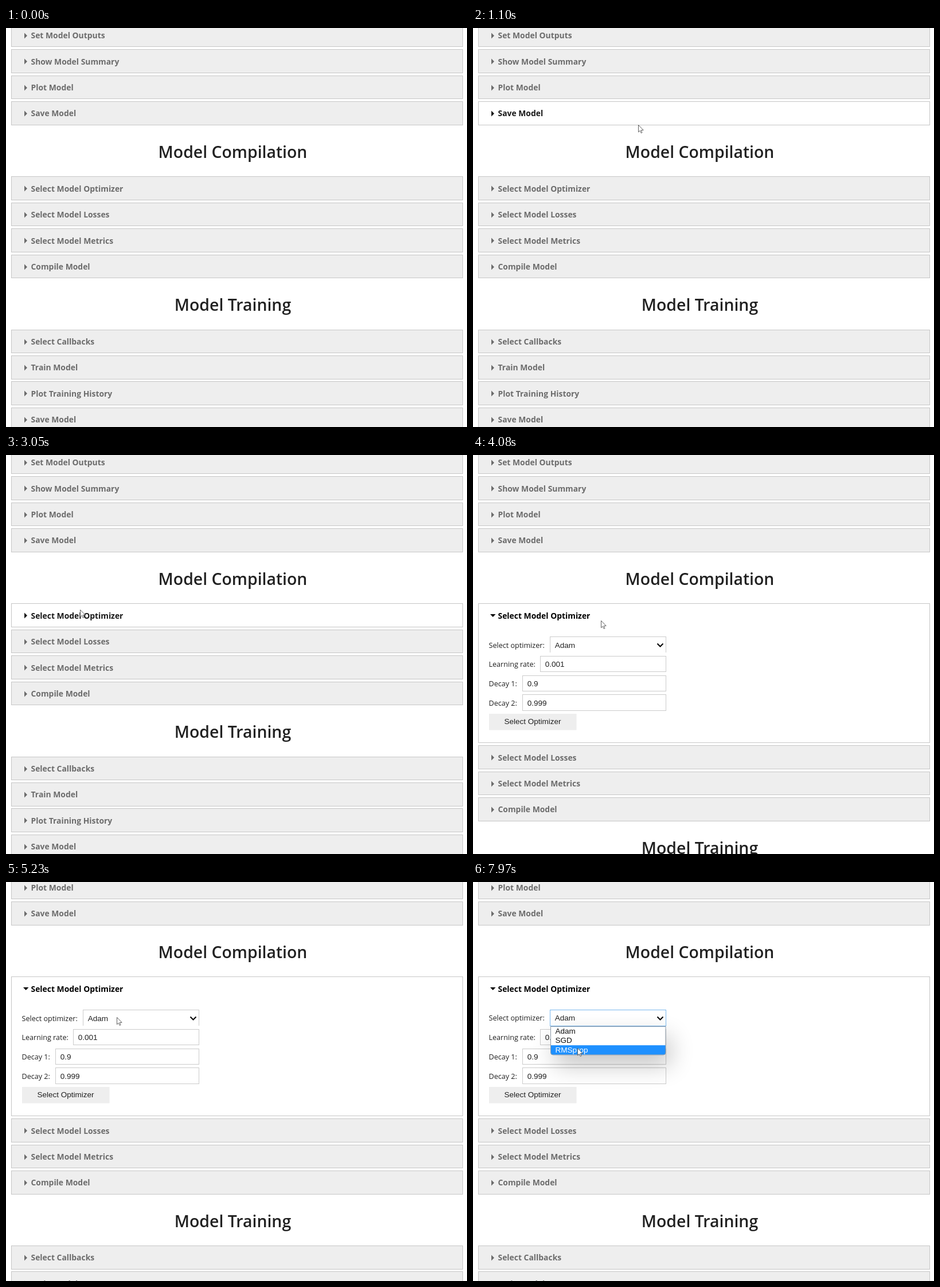
These frames come from a looping animation (804x697 px, 8 s). An HTML page with a canvas:

```html
<!DOCTYPE html>
<html lang="en">
<head>
<meta charset="utf-8">
<title>Model builder</title>
<style>
  html, body { margin: 0; height: 100%; overflow: hidden; background: #fff; }
  canvas { display: block; }
</style>
</head>
<body>
<canvas id="stage" width="804" height="697"></canvas>
<script>
const ctx = document.getElementById('stage').getContext('2d');
const LOOP = 8000, STEP = 69.7, OPEN = 4080, SCROLL = 4540, FOCUS = 5800;
const ROW_PITCH = 45.4, ROW_HEIGHT = 41.6, OPEN_EXTRA = 202.4;
const FIELD_PITCH = 33.8, OPTION_HEIGHT = 16.6;
const UI = '"Open Sans", "Noto Sans", sans-serif';
const ARIAL = '13.5px "Liberation Sans", Arial, sans-serif';
const BORDER = '#c6c6c6', INK = '#212121';

const sections = [
  { top: -8.2, rows: ['Set Model Outputs', 'Show Model Summary', 'Plot Model', 'Save Model'] },
  { title: 'Model Compilation', top: 259.4,
    rows: ['Select Model Optimizer', 'Select Model Losses', 'Select Model Metrics', 'Compile Model'] },
  { title: 'Model Training', top: 526.6,
    rows: ['Select Callbacks', 'Train Model', 'Plot Training History', 'Save Model'] },
];
const fields = [
  ['Select optimizer:', 134, 'Adam'],
  ['Learning rate:', 117, '0.001'],
  ['Decay 1:', 86, '0.9'],
  ['Decay 2:', 86, '0.999'],
];
const options = ['Adam', 'SGD', 'RMSprop'];

const mix = (a, b, u) => a + (b - a) * u;
const smooth = u => u * u * (3 - 2 * u);
const clamp = u => Math.min(1, Math.max(0, u));

const hold = (t, start) => start + Math.floor((t - start) / STEP) * STEP;

const line = (x0, y0, x1, y1) => u => [mix(x0, x1, smooth(u)), mix(y0, y1, smooth(u))];

function enter(u) {
  const cubic = (a, b, c, d) =>
    a * (1 - u) ** 3 + 3 * b * u * (1 - u) ** 2 + 3 * c * u * u * (1 - u) + d * u ** 3;
  return [cubic(742, 816, 470, 288), cubic(676, 298, 140, 169)];
}

// Widening elliptical loop around the first heading
function circle(u) {
  const angle = mix(-2.02, -10.3, u), radius = mix(.7, 1.7, u);
  return [350 + 205 * radius * Math.cos(angle), 202 + 52 * radius * Math.sin(angle)];
}

const moves = [
  { from: 330, to: 1100, path: enter },
  { from: 1100, to: 3050, path: circle },
  { from: 3050, to: 3610, path: line(129, 270, 223, 289) },
  { from: SCROLL, to: 5230, path: line(224, 289, 192, 235) },
  { from: 6290, to: 6700, path: line(192, 235, 191, 243) },
  { from: 6900, to: 7300, path: line(191, 243, 185, 269) },
  { from: 7760, to: 7970, path: line(185, 271, 182, 290) },
];

function pointerAt(t) {
  const move = moves.findLast(m => m.from <= t);
  if (!move) return null;
  const { from, to, path } = move;
  const [x, y] = path(clamp((hold(t, from) - from) / (to - from))).map(Math.round);
  return { x, y };
}

function scrollAt(t) {
  if (t < SCROLL) return 0;
  return Math.round(94 * smooth(clamp((hold(t, SCROLL) - SCROLL + 52) / 190)));
}

function text(str, x, y, font, color, align = 'left') {
  ctx.font = font;
  ctx.fillStyle = color;
  ctx.textAlign = align;
  ctx.fillText(str, x, Math.round(y));
}

// Bordered box with its edges snapped to whole pixels
function box(x, top, right, bottom, fill, stroke) {
  const y = Math.round(top), w = right - x, h = Math.round(bottom) - y;
  ctx.fillStyle = fill;
  ctx.fillRect(x, y, w, h);
  ctx.strokeStyle = stroke;
  ctx.lineWidth = 1;
  ctx.strokeRect(x + .5, y + .5, w - 1, h - 1);
}

function polygon(points, color) {
  ctx.beginPath();
  points.forEach(([x, y]) => ctx.lineTo(x, y));
  ctx.closePath();
  ctx.fillStyle = color;
  ctx.fill();
}

function drawRow(label, top, open, hover) {
  const mid = Math.round(top) + 21.5;
  const color = open ? '#000' : hover ? '#181818' : '#6c6c6c';
  const bottom = top + ROW_HEIGHT + (open ? OPEN_EXTRA : 0);
  box(9, top, 797, bottom, open || hover ? '#fff' : '#eee', BORDER);
  polygon(open
    ? [[30, mid - 2.5], [39.5, mid - 2.5], [34.7, mid + 2.5]]
    : [[32, mid - 5], [37, mid], [32, mid + 5]], color);
  text(label, 43.5, top + 26.4, `bold 13.9px ${UI}`, color);
}

function drawForm(top, focused) {
  fields.forEach(([label, x, value], i) => {
    const y = top + FIELD_PITCH * i, lift = focused && !i ? 1 : 0;
    box(x, y, 337, y + 28.6, '#fff', lift ? '#7ab8ee' : '#cbcbcb');
    if (!i && !focused) {
      ctx.fillStyle = '#fff';
      ctx.fillRect(x, y + 28, 337 - x, 1);
    }
    text(label, 27.5, y + 19.6 - lift, `12.6px ${UI}`, INK);
    text(value, x + 8.7, y + 19.6 - lift, ARIAL, INK);
  });
  ctx.beginPath();
  ctx.moveTo(321.5, top + 12.5);
  ctx.lineTo(326.5, top + 17.5);
  ctx.lineTo(331.5, top + 12.5);
  ctx.strokeStyle = '#000';
  ctx.lineWidth = 2;
  ctx.stroke();
  ctx.fillStyle = '#eee';
  ctx.fillRect(28, top + 135, 152.5, 28.5);
  text('Select Optimizer', 104, top + 153, ARIAL, INK, 'center');
}

function drawOptions(active) {
  ctx.beginPath();
  ctx.roundRect(135.5, 252.5, 200.5, 49.5, [0, 0, 4, 4]);
  ctx.save();
  ctx.shadowColor = 'rgba(0,0,0,.24)';
  ctx.shadowBlur = 40;
  ctx.shadowOffsetX = 8;
  ctx.shadowOffsetY = 18;
  ctx.fillStyle = '#fff';
  ctx.fill();
  ctx.restore();
  ctx.save();
  ctx.clip();
  ctx.fillStyle = '#1e90ff';
  ctx.fillRect(135, 252 + OPTION_HEIGHT * active, 202, OPTION_HEIGHT);
  ctx.restore();
  ctx.strokeStyle = '#8c9aa8';
  ctx.lineWidth = 1;
  ctx.stroke();
  options.forEach((name, i) =>
    text(name, 143.5, 264.5 + OPTION_HEIGHT * i, ARIAL, i === active ? '#fff' : '#111'));
}

function drawPointer({ x, y }, clicked) {
  if (clicked) {
    ctx.beginPath();
    ctx.arc(x + .5, y - .5, 11.5, 0, 2 * Math.PI);
    ctx.fillStyle = 'rgba(255,255,0,.47)';
    ctx.fill();
  }
  ctx.save();
  ctx.translate(x + .5, y + .5);
  polygon([[0, 0], [0, 12.3], [2.8, 9.8], [4.7, 14], [6.5, 13.2], [4.7, 9.1], [8.6, 8.9]], '#fff');
  ctx.strokeStyle = '#505050';
  ctx.lineWidth = .9;
  ctx.stroke();
  ctx.restore();
}

function draw(t) {
  const pointer = pointerAt(t), opened = t >= OPEN;
  ctx.fillStyle = '#fff';
  ctx.fillRect(0, 0, 804, 697);

  ctx.save();
  ctx.translate(0, -scrollAt(t));
  sections.forEach(({ title, top, rows }, s) => {
    const sectionShift = opened && s === 2 ? OPEN_EXTRA : 0;
    if (title) {
      text(title, 395.5, top - 32.4 + sectionShift, `600 28.4px ${UI}`, INK, 'center');
    }
    rows.forEach((label, i) => {
      const shift = opened && s === 1 && i ? OPEN_EXTRA : sectionShift;
      const y = top + ROW_PITCH * i + shift;
      const hover = !opened && pointer && pointer.y >= y && pointer.y <= y + ROW_HEIGHT;
      drawRow(label, y, opened && s === 1 && !i, hover);
    });
  });
  if (opened) drawForm(317, t >= FOCUS);
  ctx.restore();

  if (t >= FOCUS) {
    const active = Math.floor((pointer.y - 251.5) / OPTION_HEIGHT);
    drawOptions(Math.max(0, active));
  }
  const clicked = (t >= 3880 && t < OPEN) || (t >= 5700 && t < 5900);
  if (pointer) drawPointer(pointer, clicked);
}

const begin = performance.now();
function tick() {
  draw((performance.now() - begin) % LOOP);
  requestAnimationFrame(tick);
}
tick();
</script>
</body>
</html>
```
